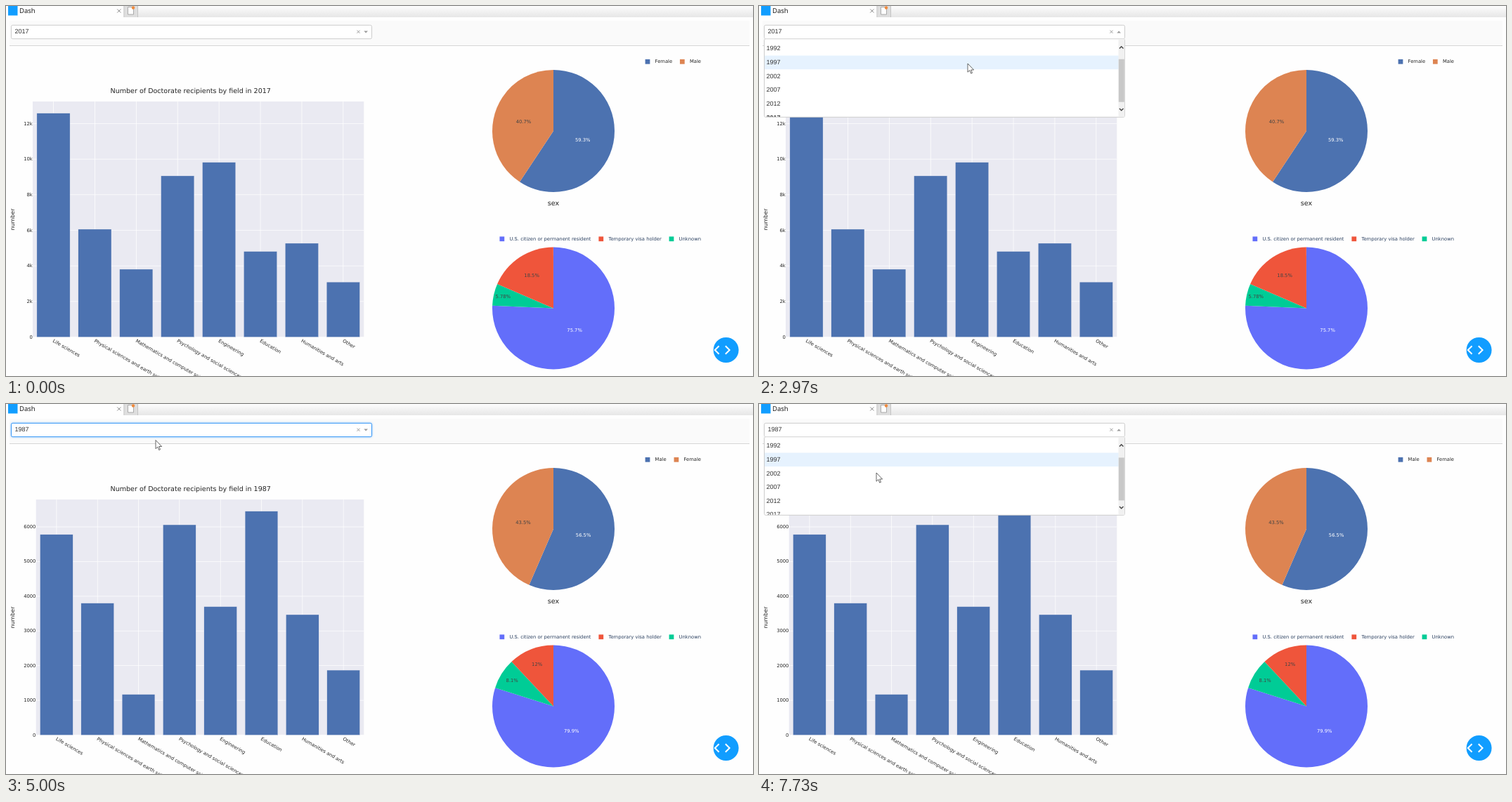
Animation of 1063x527 px, one loop 8 s. Source, as an HTML page with a canvas:

```html
<!DOCTYPE html>
<html lang="en">
<head>
<meta charset="utf-8">
<title>Dash</title>
<style>
html, body { margin: 0; width: 100%; height: 100%; overflow: hidden; background: #fefefe; }
canvas { display: block; width: 1063px; height: 527px; }
</style>
</head>
<body>
<canvas id="stage"></canvas>
<script>
const W = 1063, H = 527, LOOP = 8000, TAU = Math.PI * 2;
const canvas = document.getElementById('stage');
const ctx = canvas.getContext('2d');
const dpr = window.devicePixelRatio || 1;
canvas.width = W * dpr;
canvas.height = H * dpr;

const CHART = '"DejaVu Sans", sans-serif', FORM = '9px "Liberation Sans", sans-serif';
const SMALL = '6.77px ' + CHART, LARGE = '9.56px ' + CHART;
const INK = '#242424', NAVY = '#2a3f5f';
const BLUE = '#4c72b0', ORANGE = '#dd8452';
const VIOLET = '#636efa', RED = '#ef553b', GREEN = '#00cc96';
const FIELDS = ['Life sciences', 'Physical sciences and earth sciences',
  'Mathematics and computer sciences', 'Psychology and social sciences',
  'Engineering', 'Education', 'Humanities and arts', 'Other'];
const YEARS = Array.from({ length: 7 }, (_, i) => 1987 + 5 * i);

// bars in thousands, pie shares in percent
const DATA = {
  2017: {
    bars: [12.58, 6.06, 3.81, 9.06, 9.82, 4.81, 5.27, 3.09],
    step: 2, tick: k => k ? k + 'k' : '0',
    sexes: ['Female', 'Male'], major: 59.3, citizen: 75.7, unknown: 5.78, visa: 18.5
  },
  1987: {
    bars: [5.78, 3.8, 1.17, 6.06, 3.7, 6.45, 3.47, 1.87],
    step: 1, tick: k => String(k * 1000),
    sexes: ['Male', 'Female'], major: 56.5, citizen: 79.9, unknown: 8.1, visa: 12
  }
};

// pointer moves: begin, end, target x, target y
const START = [700, 500];
const MOVES = [[300, 690, 626, 256], [870, 1640, 513, 37], [2200, 2820, 297, 82],
  [3310, 3390, 269, 82.5], [3390, 4080, 216, 56], [4700, 5000, 213, 51.5],
  [5000, 5560, 226, 71], [5870, 6400, 229, 44], [6820, 7350, 167, 98]];

const between = (t, a, b) => t >= a && t < b;
const progress = (t, a, b) => Math.min(1, Math.max(0, (t - a) / (b - a)));
const smooth = u => u * u * (3 - 2 * u);
const easeOut = u => u * (2 - u);

function pointerAt(t) {
  let [x, y] = START;
  for (const [a, b, tx, ty] of MOVES) {
    const u = smooth(progress(t, a, b));
    x += (tx - x) * u;
    y += (ty - y) * u;
  }
  return [x, y];
}

function rect(x, y, w, h, color) {
  ctx.fillStyle = color;
  ctx.fillRect(x, y, w, h);
}

function disc(x, y, r, color) {
  ctx.fillStyle = color;
  ctx.beginPath();
  ctx.arc(x, y, r, 0, TAU);
  ctx.fill();
}

function poly(points, fill, stroke, width = 1, close = true) {
  ctx.beginPath();
  for (let i = 0; i < points.length; i += 2) ctx.lineTo(points[i], points[i + 1]);
  if (close) ctx.closePath();
  if (fill) { ctx.fillStyle = fill; ctx.fill(); }
  if (stroke) { ctx.strokeStyle = stroke; ctx.lineWidth = width; ctx.stroke(); }
}

const line = (points, color, width) => poly(points, null, color, width, false);

function cross(x, y, r, color, width) {
  line([x - r, y - r, x + r, y + r], color, width);
  line([x + r, y - r, x - r, y + r], color, width);
}

// a V shape; (dx, dy) points from the tip to the middle of its open side
function chevron(x, y, dx, dy, color, width) {
  line([x + dx - dy, y + dy - dx, x, y, x + dx + dy, y + dy + dx], color, width);
}

function text(str, x, y, font, color, align = 'left', angle = 0) {
  ctx.save();
  ctx.translate(x, y);
  ctx.rotate(angle);
  ctx.font = font;
  ctx.fillStyle = color;
  ctx.textAlign = align;
  ctx.textBaseline = 'middle';
  ctx.fillText(str, 0, 0);
  ctx.restore();
}

function widthOf(str, font) {
  ctx.font = font;
  return ctx.measureText(str).width;
}

function browserBar(title) {
  const g = ctx.createLinearGradient(0, 0, 0, 16);
  g.addColorStop(0, '#fdfdfd');
  g.addColorStop(1, '#e6e6e6');
  rect(168, 0, W - 168, 16, g);
  rect(168, 0, 19.5, 16, '#dedede');
  rect(167.5, 0, 0.7, 16, '#b5b5b5');
  rect(187, 0, 0.7, 16, '#b5b5b5');
  poly([173.5, 1.5, 179, 1.5, 181.5, 4, 181.5, 12, 173.5, 12], '#fff', '#999', 0.8);
  disc(181, 2.5, 2.2, '#f08a3c');
  rect(3, 0, 13.5, 13.5, '#119dff');
  text(title, 19, 7.8, '9.5px "Open Sans", sans-serif', '#111');
  cross(160.8, 7, 2.5, '#7d7d7d', 0.9);
}

function panel() {
  rect(5, 21, 1053, 35, '#fafafa');
  rect(5, 56, 1053, 1, '#d6d6d6');
}

function barChart(year) {
  const { bars, step, tick } = DATA[year];
  const top = 136, base = 471.5, right = 509.3, max = Math.max(...bars) / 0.95;
  const ticks = [];
  for (let k = 0; k < max; k += step) ticks.push(k);
  const left = 25.5 + Math.max(...ticks.map(k => widthOf(tick(k), SMALL)));
  const slot = (right - left) / 8, scale = (base - top) / max;

  rect(left, top, right - left, base - top, '#eaeaf2');
  for (const k of ticks) {
    const y = base - k * scale;
    rect(left, y - 0.35, right - left, 0.7, '#fff');
    text(tick(k), left - 0.3, y + 0.3, SMALL, INK, 'right');
  }
  FIELDS.forEach((name, i) => {
    const x = left + slot * (i + 0.5), h = bars[i] * scale;
    rect(x - 0.35, top, 0.7, base - top, '#fff');
    rect(x - slot * 0.4, base - h, slot * 0.8, h, BLUE);
    ctx.strokeStyle = '#eaeaf2';
    ctx.lineWidth = 0.3;
    ctx.strokeRect(x - slot * 0.4, base - h, slot * 0.8, h);
    text(name, x - 0.5, 476.8, SMALL, INK, 'left', Math.PI / 6);
  });
  text('Number of Doctorate recipients by field in ' + year, 262.7, 121.3, LARGE, INK, 'center');
  text('number', 10, 304, '7.9px ' + CHART, INK, 'center', -Math.PI / 2);
}

// slices run clockwise from the top; each label sits in its slice's inscribed circle
function pie(cx, cy, slices) {
  const r = 87, half = Math.PI / 100;
  let a = -Math.PI / 2;
  slices.forEach(([share, color], i) => {
    const turn = share * half, mid = a + turn, end = mid + turn;
    ctx.fillStyle = color;
    ctx.beginPath();
    ctx.moveTo(cx, cy);
    ctx.arc(cx, cy, r, a, end);
    ctx.fill();
    const inset = share < 50 ? 1 / (1 + 1 / Math.sin(turn)) : 0.5;
    const reach = r * (1 - inset);
    text(share + '%', cx + reach * Math.cos(mid), cy + reach * Math.sin(mid) + 0.3,
      SMALL, i ? '#444' : '#fff', 'center');
    a = end;
  });
}

// right-aligned row of keys
function legend(y, color, items) {
  let x = 989;
  for (const [label, fill] of items.reverse()) {
    x -= widthOf(label, SMALL);
    text(label, x, y + 0.3, SMALL, color);
    x -= 14;
    rect(x, y - 3.4, 6.75, 6.75, fill);
    x -= 10.9;
  }
}

function pies(year) {
  const { sexes, major, citizen, unknown, visa } = DATA[year];
  pie(779, 178, [[major, BLUE], [+(100 - major).toFixed(1), ORANGE]]);
  legend(79.3, INK, [[sexes[0], BLUE], [sexes[1], ORANGE]]);
  text('sex', 779, 281.5, LARGE, INK, 'center');
  pie(779, 430.5, [[citizen, VIOLET], [unknown, GREEN], [visa, RED]]);
  legend(331.8, NAVY, [['U.S. citizen or permanent resident', VIOLET],
    ['Temporary visa holder', RED], ['Unknown', GREEN]]);
}

function debugButton() {
  disc(1024.6, 490, 18, '#119dff');
  chevron(1008.8, 490, 5.8, 0, '#fff', 2);
  chevron(1029.6, 490, -5.8, 0, '#fff', 2);
}

// faint chart tools, laid out in groups
function tools(x, y, groups) {
  ctx.strokeStyle = 'rgba(68,68,68,.3)';
  ctx.lineWidth = 1.4;
  for (const n of groups) {
    for (let i = 0; i < n; i++, x += 13.5) ctx.strokeRect(x + 1, y + 1.5, 7, 6);
    x += 4.5;
  }
}

function box(y, h, stroke) {
  ctx.beginPath();
  ctx.roundRect(7.5, y, 513, h, 2);
  ctx.fillStyle = '#fff';
  ctx.fill();
  ctx.strokeStyle = stroke;
  ctx.lineWidth = 0.9;
  ctx.stroke();
}

function select(year, open, focused, caret) {
  ctx.save();
  if (focused) {
    ctx.shadowColor = 'rgba(0,126,255,.35)';
    ctx.shadowBlur = 3 * dpr;
  }
  box(27.3, 19.4, focused ? '#2f93f5' : '#c8c8c8');
  ctx.restore();
  text(year, 12.6, 37, FORM, '#333');
  cross(501.5, 36.7, 2, '#999', 1);
  const dir = open ? 1 : -1;
  poly([509.3, 37 + 1.5 * dir, 515, 37 + 1.5 * dir, 512.1, 37 - 1.5 * dir], '#999');
  if (caret) rect(13, 32.3, 0.8, 9.5, '#222');
}

const ROW = 19.62, LIST = 47.2;

function menu(year, scroll, hover) {
  box(46.7, 111.6, '#c8c8c8');
  rect(8, 46.2, 512, 1, '#e2e2e2');
  ctx.save();
  ctx.beginPath();
  ctx.rect(8, LIST, 512.5, 110.6);
  ctx.clip();
  YEARS.forEach((y, i) => {
    const top = LIST + i * ROW - scroll;
    if (i === hover) rect(8, top, 504, ROW, '#e6f2fe');
    text(y, 10.6, top + ROW / 2 + 0.2, (y === year ? 'bold ' : '') + FORM, '#333');
  });
  rect(511.5, 47, 9, 112, '#f1f1f1');
  rect(511.8, 66.2 + scroll * 0.6, 8, 61, '#c8c8c8');
  chevron(515.7, 57.8, 0, 2.8, '#444', 1.4);
  chevron(515.7, 148.8, 0, -2.8, '#444', 1.4);
  ctx.restore();
}

function arrow() {
  poly([0, 0, 0, 12.2, 2.8, 9.6, 4.7, 14.1, 6.5, 13.3, 4.7, 9, 8.6, 9], '#fff', '#333', 0.75);
}

function hand() {
  poly([-1.5, 10, -1.5, 1, 0, 0, 1.4, 1, 1.4, 5.5, 6, 6, 7.6, 7.5, 7.6, 11, 6, 15.5,
    0, 15.5, -4.5, 9.2, -3.6, 8.2], '#fff', '#222', 0.8);
  for (const x of [3.5, 5.5]) line([x, 6, x, 9], '#222', 0.7);
}

function beam() {
  for (const y of [-5.5, 5.5]) line([-2.8, y, 2.8, y], '#222', 1);
  line([0, -5.5, 0, 5.5], '#222', 1.2);
}

function pointer(x, y) {
  ctx.save();
  ctx.translate(x, y);
  if (y > LIST || x > 521) arrow();
  else if (x > 495) hand();
  else beam();
  ctx.restore();
}

function click(t, start, length, x, y, r) {
  if (between(t, start, start + length)) disc(x, y, r, 'rgba(255,236,40,.75)');
}

function draw(t) {
  const [x, y] = pointerAt(t), shown = t >= 300;
  const year = t < 4310 ? 2017 : 1987;
  const charted = t < 4760 ? 2017 : 1987;
  const opened = between(t, 2120, 4310) ? 2120 : t >= 6640 ? 6640 : 0;
  const slide = 17 * easeOut(progress(t, 7500, 7730));
  const offset = t < 4310 ? 27 * (1 - easeOut(progress(t, 2895, 3220))) : 0;
  const caret = opened && Math.floor((t - opened) / 530) % 2 === 0 && !slide;

  ctx.setTransform(dpr, 0, 0, dpr, 0, 0);
  ctx.textRendering = 'geometricPrecision';
  rect(0, 0, W, H, '#fefefe');
  browserBar(between(t, 4380, 4760) ? 'Updating...' : 'Dash');
  panel();
  barChart(charted);
  pies(charted);
  if (shown && !opened && y > 57) {
    if (x < 540) tools(322, 60, [1, 4, 4, 3, 1]);
    else tools(989, y > 312 ? 313 : 60, [1, 1, 1]);
  }
  debugButton();

  select(year, opened, between(t, 4310, 6640), caret);
  if (opened) {
    // the highlight keeps its row during the last slide
    const hover = y > LIST ? Math.floor((y - LIST + offset) / ROW) : YEARS.indexOf(year);
    menu(year, offset + slide, hover);
  }

  click(t, 2030, 90, x, y, 9.8);
  click(t, 4220, 90, x, y, 9.8);
  click(t, 6550, 180, x, y, 8.5);
  if (shown) pointer(x, y);
}

function frame(now) {
  draw(now % LOOP);
  requestAnimationFrame(frame);
}
requestAnimationFrame(frame);
</script>
</body>
</html>
```
